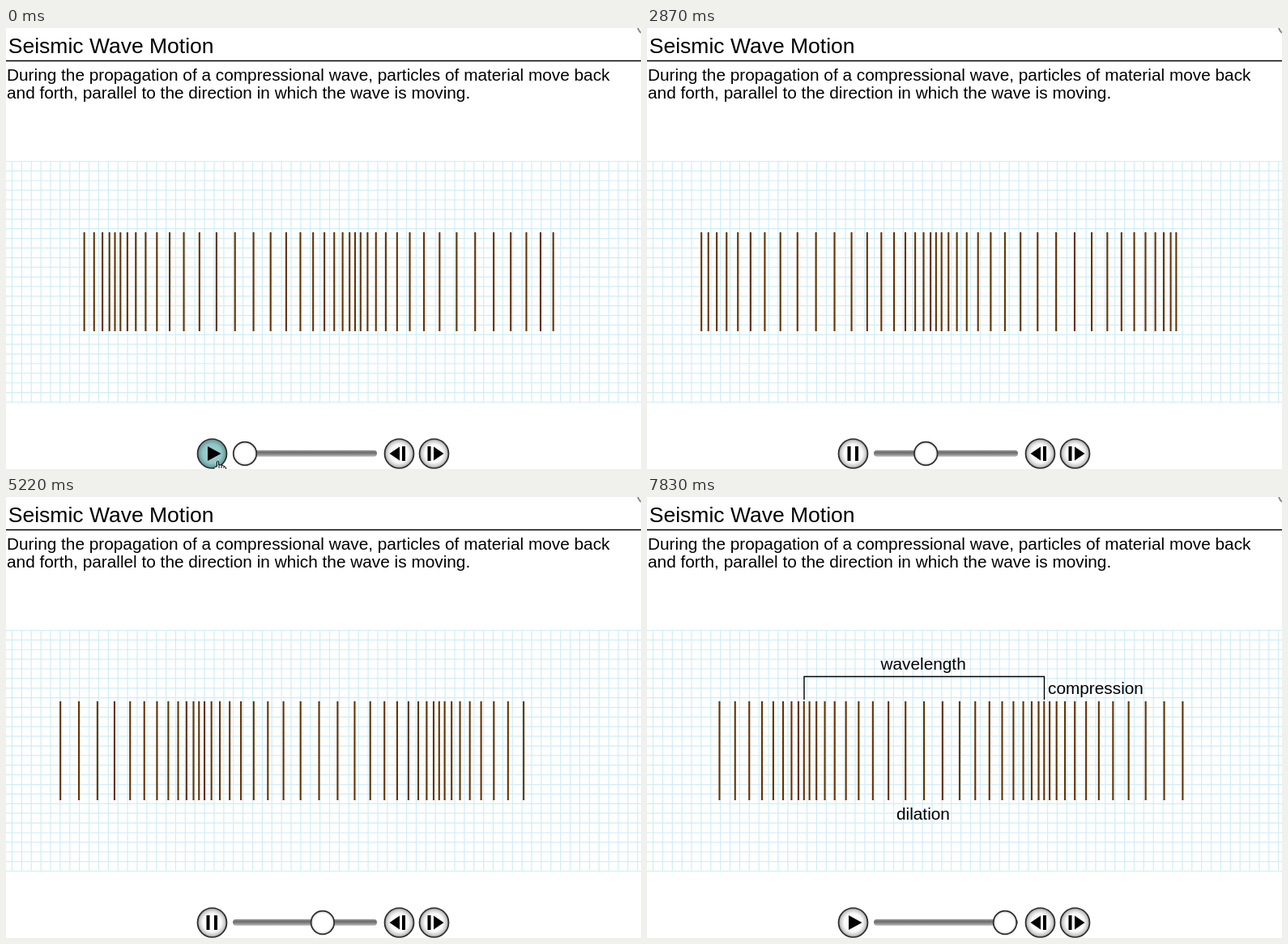
Recreate the animation shown at these times as an HTML page with a canvas. Size 784 by 544 pixels, loop 8560 ms.

```html
<!DOCTYPE html>
<html lang="en">
<head>
<meta charset="utf-8">
<title>Seismic Wave Motion</title>
<style>
html, body { margin: 0; width: 100%; height: 100%; overflow: hidden; background: #fff; }
canvas { display: block; }
</style>
</head>
<body>
<canvas id="stage" width="784" height="544"></canvas>
<script>
const ctx = document.getElementById('stage').getContext('2d');
const LOOP = 8560, START = 330, STEP = 1000 / 22, LAST = 164;
const BROWN = '#663300';

// Screen refresh times: every 60 ms, with a few longer holds.
const longHolds = [1400, 1590, 1780, 4970, 5520, 5830, 6080];
const ticks = [0, 60, 120];
for (let t = 320; t <= 7830; t += longHolds.includes(t) ? 130 : 60) ticks.push(t);

function line(width, color, ...points) {
  ctx.beginPath();
  points.forEach(([x, y]) => ctx.lineTo(x, y));
  ctx.lineWidth = width;
  ctx.strokeStyle = color;
  ctx.stroke();
}

function shape(...points) {
  ctx.beginPath();
  points.forEach(([x, y]) => ctx.lineTo(x, y));
  ctx.fillStyle = '#000';
  ctx.fill();
}

function text(str, x, y, size = 20.8) {
  ctx.font = `${size}px "Liberation Sans", Arial, sans-serif`;
  ctx.fillStyle = '#000';
  ctx.fillText(str, x, y);
}

function disc(x, y, r, stops, border) {
  const g = ctx.createRadialGradient(x, y, 0, x, y, r);
  stops.forEach(([at, color]) => g.addColorStop(at, color));
  ctx.beginPath();
  ctx.arc(x, y, r, 0, 2 * Math.PI);
  ctx.fillStyle = g;
  ctx.fill();
  ctx.lineWidth = border;
  ctx.strokeStyle = '#2b2b2b';
  ctx.stroke();
}

function button(x, hover) {
  const stops = hover
    ? [[0, '#a6d3d3'], [0.65, '#93c6c6'], [1, '#5f9090']]
    : [[0, '#fff'], [0.62, '#fafafa'], [0.85, '#cfcfcf'], [1, '#8e8e8e']];
  disc(x, 525, 18, stops, 1.7);
}

function bar(x) {
  ctx.fillStyle = '#000';
  ctx.fillRect(x, 516, 4, 18);
}

function page() {
  ctx.fillStyle = '#fff';
  ctx.fillRect(0, 0, 784, 544);
  text('Seismic Wave Motion', 2.8, 30.5, 26.5);
  line(1.5, '#000', [0, 40.5], [784, 40.5]);
  line(2, '#888', [780, 0], [782, 4], [784, 6]);
  text('During the propagation of a compressional wave, particles of material move back', 1, 65);
  text('and forth, parallel to the direction in which the wave is moving.', 1, 87);
  for (let i = 0; i <= 25; i++) {
    const y = 164.5 + i * 11.88;
    line(1.2, '#cfeef5', [0, y], [784, y]);
  }
  for (let x = 7.5; x < 784; x += 11.88) line(1.2, '#cfeef5', [x, 164], [x, 462]);
}

// Back-and-forth motion: parabolic easing to either side, 20 steps per cycle.
function shift(k) {
  k = ((k % 20) + 20) % 20;
  const u = (k % 10) / 5 - 1;
  return (k < 10 ? -22.3 : 22.3) * (1 - u * u);
}

function wave(n) {
  for (let i = 0; i < 40; i++) {
    const x = 75.2 + 14.825 * i + shift(i - 4 - n);
    line(2.1, BROWN, [x, 252], [x, 374]);
  }
}

function labels() {
  line(1.4, '#000', [194, 250], [194, 221.5], [490.5, 221.5], [490.5, 250]);
  text('wavelength', 288.5, 213);
  text('compression', 495, 243);
  text('dilation', 308, 398);
}

function controls(n, playing, hover) {
  const g = ctx.createLinearGradient(0, 520.5, 0, 529);
  g.addColorStop(0, '#a8a8a8');
  g.addColorStop(0.35, '#6c6c6c');
  g.addColorStop(0.6, '#858585');
  g.addColorStop(1, '#c4c4c4');
  ctx.beginPath();
  ctx.roundRect(280, 520.8, 178, 8, 4);
  ctx.fillStyle = g;
  ctx.fill();
  disc(295 + 147 * n / LAST, 525, 14.3, [[0, '#fff'], [0.75, '#fff'], [1, '#d2d2d2']], 1.7);

  button(254.5, hover);
  if (playing) {
    bar(247.5);
    bar(257);
  } else {
    shape([249, 516], [265.5, 525], [249, 534]);
  }
  button(485.5);
  shape([473.5, 525], [486, 516.5], [486, 533.5]);
  bar(489);
  button(528.5);
  bar(520.5);
  shape([528, 516.5], [540.5, 525], [528, 533.5]);
}

function hand(x, y) {
  ctx.save();
  ctx.translate(x, y);
  ctx.beginPath();
  [[1, 7], [1, 1], [2, 0], [3, 1], [3, 5], [6, 5], [9, 6], [12, 8], [12, 14], [0, 14], [-3, 9], [-2, 7.5]]
    .forEach(([px, py]) => ctx.lineTo(px, py));
  ctx.closePath();
  ctx.fillStyle = '#fff';
  ctx.fill();
  ctx.lineWidth = 1;
  ctx.strokeStyle = '#000';
  ctx.stroke();
  line(1, '#000', [3.5, 5], [3.5, 9]);
  line(1, '#000', [6.5, 5.5], [6.5, 9]);
  line(1, '#000', [9.5, 6.5], [9.5, 9]);
  ctx.restore();
}

function draw(now) {
  const time = now % LOOP;
  const t = ticks.findLast(tick => tick <= time) ?? 0;
  const n = Math.min(LAST, Math.max(0, Math.floor((t - START) / STEP)));
  const waiting = t < 320, done = n === LAST;
  page();
  wave(n);
  if (done) labels();
  controls(n, !waiting && !done, waiting);
  if (waiting) hand(259.5 - t / 20, 534 - t / 40);
}

const begin = performance.now();
function loop() {
  draw(performance.now() - begin);
  requestAnimationFrame(loop);
}
loop();
</script>
</body>
</html>
```
